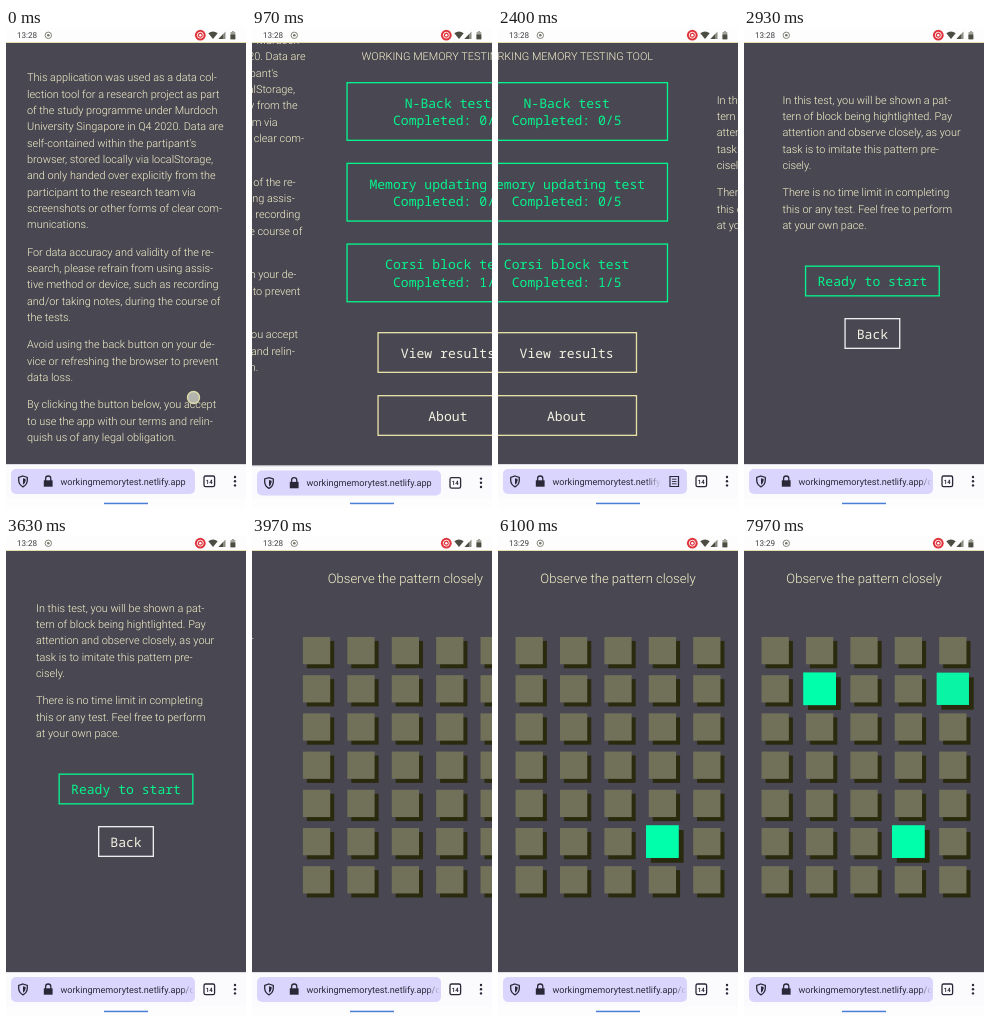
An HTML page with a canvas that plays this animation: 240 by 480 pixels, repeating every 8000 ms.

```html
<!DOCTYPE html>
<html lang="en">
<head>
<meta charset="utf-8">
<title>Working memory testing tool</title>
<style>
  html, body { margin: 0; height: 100%; overflow: hidden; background: #484752; }
  canvas { display: block; width: 240px; height: 480px; }
</style>
</head>
<body>
<canvas id="stage"></canvas>
<script>
const W = 240, H = 480, LOOP = 8000;
const BG = '#484752', CREAM = '#f8f4cc', GREEN = '#05f58c', INK = '#2a2838';
const REM = 10.9, LINE = 1.5 * REM, PARAGRAPH = 2.5 * REM;
const LIGHT = `300 ${REM}px Roboto, sans-serif`;
const HEADING = `300 ${1.2 * REM}px Roboto, sans-serif`;
const MONO = `${1.2 * REM}px "Noto Sans Mono", monospace`;

const canvas = document.getElementById('stage');
const ctx = canvas.getContext('2d');
const dpr = window.devicePixelRatio || 1;
canvas.width = W * dpr;
canvas.height = H * dpr;
ctx.textRendering = 'geometricPrecision';

const clamp = (v, lo = 0, hi = 1) => Math.min(hi, Math.max(lo, v));
const progress = (t, start, length) => clamp((t - start) / length);
const outQuad = p => 1 - (1 - p) ** 2;
const outExpo = p => p >= 1 ? 1 : 1 - 2 ** (-10 * p);

function rect(x, y, w, h, color) {
  ctx.fillStyle = color;
  ctx.fillRect(x, y, w, h);
}

function text(str, x, y, font, color, align = 'left') {
  ctx.font = font;
  ctx.fillStyle = color;
  ctx.textAlign = align;
  ctx.fillText(str, x, y);
}

function circle(x, y, r, fill, stroke, width = 1) {
  ctx.beginPath();
  ctx.arc(x, y, r, 0, 2 * Math.PI);
  if (fill) { ctx.fillStyle = fill; ctx.fill(); }
  if (stroke) { ctx.strokeStyle = stroke; ctx.lineWidth = width; ctx.stroke(); }
}

function shape(d, color, lineWidth) {
  const path = new Path2D(d);
  ctx.fillStyle = ctx.strokeStyle = color;
  ctx.lineWidth = lineWidth;
  lineWidth ? ctx.stroke(path) : ctx.fill(path);
}

function paragraphs(list, x, y) {
  for (const block of list) {
    const lines = block.split('|');
    lines.forEach((line, i) => text(line, x, y + i * LINE, LIGHT, CREAM));
    y += (lines.length - 1) * LINE + PARAGRAPH;
  }
}

function button(lines, y, w, h, border, color) {
  ctx.strokeStyle = border;
  ctx.lineWidth = 1.33;
  ctx.strokeRect((W - w) / 2 + .67, y + .67, w - 1.33, h - 1.33);
  const first = y + h / 2 + 5.2 - (lines.length - 1) * 8.75;
  lines.forEach((line, i) => text(line, W / 2, first + i * 17.5, MONO, color, 'center'));
}

const CONSENT = [
  'This application was used as a data col-|lection tool for a research project as part|of the study programme under Murdoch|University Singapore in Q4 2020. Data are|self-contained within the partipant\'s|browser, stored locally via localStorage,|and only handed over explicitly from the|participant to the research team via|screenshots or other forms of clear com-|munications.',
  'For data accuracy and validity of the re-|search, please refrain from using assis-|tive method or device, such as recording|and/or taking notes, during the course of|the tests.',
  'Avoid using the back button on your de-|vice or refreshing the browser to prevent|data loss.',
  'By clicking the button below, you accept|to use the app with our terms and relin-|quish us of any legal obligation.'
];
const INSTRUCTIONS = [
  'In this test, you will be shown a pat-|tern of block being hightlighted. Pay|attention and observe closely, as your|task is to imitate this pattern pre-|cisely.',
  'There is no time limit in completing|this or any test. Feel free to perform|at your own pace.'
];
const TESTS = [['N-Back test', 0], ['Memory updating test', 0], ['Corsi block test', 1]];
const PATTERN = [[5, 3, 5660], [1, 1, 6670], [1, 4, 7660]];

const scrollAt = t => 70 * outQuad(progress(t, 25, 540));

function consentPage(t) {
  paragraphs(CONSENT, 21, 53.3 - scrollAt(t));
}

function menuPage() {
  text('WORKING MEMORY TESTING TOOL', W / 2, 32, LIGHT, CREAM, 'center');
  TESTS.forEach(([name, done], i) =>
    button([name, `Completed: ${done}/5`], 54 + i * 80.7, 203, 59, GREEN, GREEN));
  button(['View results'], 304, 141, 41, '#e6e0a6', '#f4f2e0');
  button(['About'], 367, 141, 41, '#e6e0a6', '#f4f2e0');
}

function instructionPage() {
  paragraphs(INSTRUCTIONS, 30, 75.6);
  button(['Ready to start'], 237.5, 135, 31, GREEN, GREEN);
  button(['Back'], 290, 56, 31, '#eeecf0', '#f4f2e0');
}

function block(row, col, lit) {
  const size = 27.3, scale = 1 + .2 * lit;
  const mix = (a, b) => Math.round(a + (b - a) * lit);
  ctx.save();
  ctx.translate(31.2 + col * 44.4, 114.6 + row * 38.2);
  ctx.scale(scale, scale);
  rect(4 - size / 2, 4 - size / 2, size, size, '#2a2a0e');
  rect(-size / 2, -size / 2, size, size, `rgb(${mix(113, 0)},${mix(112, 255)},${mix(88, 171)})`);
  ctx.restore();
}

function gridPage(t) {
  text('Observe the pattern closely', W / 2, 47, HEADING, CREAM, 'center');
  for (let row = 0; row < 7; row++) {
    for (let col = 0; col < 5; col++) {
      const hit = PATTERN.find(([r, c]) => r === row && c === col);
      block(row, col, hit ? outQuad(progress(t, hit[2], 430)) : 0);
    }
  }
}

// Each page pushes the previous one off to the left.
const PAGES = [
  [consentPage, -2000], [menuPage, 775], [instructionPage, 2360], [gridPage, 3635]
];

function pages(t) {
  const moved = PAGES.map(([, start]) => outExpo(progress(t, start, 1180)));
  PAGES.forEach(([draw], i) => {
    const x = W * (1 - moved[i] - (moved[i + 1] || 0));
    if (Math.abs(x) >= W) return;
    ctx.save();
    ctx.translate(x, 0);
    draw(t);
    ctx.restore();
  });
}

function touch(t) {
  ctx.globalAlpha = 1 - progress(t, 130, 100);
  circle(187.5, 369.5 - scrollAt(t), 6, 'rgba(200,200,190,.85)', '#dcdaa8', 1.4);
  ctx.globalAlpha = 1;
}

function statusBar(t) {
  rect(0, 0, W, 14, '#fdfdfd');
  rect(0, 14, W, 1, '#e6dfae');
  text(t < 5670 ? '13:28' : '13:29', 11, 10.4, '8.1px Roboto, sans-serif', '#3c3c42');
  circle(42.3, 7.3, 3.2, null, '#77776c', .9);
  circle(42.3, 7.3, 1.3, '#77776c');
  circle(194.3, 7.2, 5.4, '#e0343c');
  circle(194.3, 7.2, 3, null, '#fff', .9);
  circle(194.3, 7.2, 1.2, '#fff');
  shape('M202.3 5.2Q207 1.6 211.7 5.2L207 11Z', '#4b4d42');
  shape('M212.5 11H219.5V3.5Z', '#8b8b84');
  shape('M212.5 11H217V6.2Z', '#4b4d42');
  shape('M224.5 4H226V3H228V4H229.3V11.3H224.5Z', '#a3a39a');
  rect(224.5, 6.5, 4.8, 4.8, '#4b4d42');
}

function fadedUrl(url, from, to) {
  const fade = ctx.createLinearGradient(from, 0, to, 0);
  fade.addColorStop(0, INK);
  fade.addColorStop(1, 'rgba(42,40,56,0)');
  text(url, 54.5, 456.5, '9.1px Roboto, sans-serif', fade);
}

function addressBar(t) {
  const hidden = Math.min(34, scrollAt(t)) * (1 - outQuad(progress(t, 775, 250)));
  const reader = t >= 1250 && t < 2430;
  ctx.save();
  ctx.translate(0, hidden);
  rect(0, 436, W, 35, '#fbfafd');
  rect(0, 436, W, 1, '#dedde4');
  ctx.beginPath();
  ctx.roundRect(5, 441, 184, 25, 5);
  ctx.fillStyle = '#dad5fd';
  ctx.fill();

  shape('M17 448L21.3 449.4V452.5Q21 456.8 17 458.8Q13 456.8 12.7 452.5V449.4Z', INK, 1.3);
  shape('M17 450.3L19.6 451.1V452.5Q19.3 455.5 17 456.8Z', INK);
  shape('M39.6 453V450.6A2.6 2.6 0 0 1 44.8 450.6V453', INK, 1.3);
  rect(37.8, 452.3, 8.8, 6.4, INK);

  const path = t < 2430 ? '' : '/corsi';
  ctx.save();
  ctx.beginPath();
  ctx.rect(54, 441, 134, 25);
  ctx.clip();
  if (reader) fadedUrl('workingmemorytest.netlify.app', 148, 163);
  else fadedUrl('workingmemorytest.netlify.app' + path, path ? 175 : 186, path ? 188 : 200);
  ctx.restore();

  if (reader) {
    shape('M172 448.5H180.5V458.5H172Z', INK, 1.2);
    shape('M174 451.2H178.5M174 453.5H178.5M174 455.8H178.5', INK, .9);
  }

  ctx.beginPath();
  ctx.roundRect(198, 448, 10.6, 10.6, 1.6);
  ctx.strokeStyle = INK;
  ctx.lineWidth = 1.3;
  ctx.stroke();
  text('14', 203.3, 455.5, 'bold 6px Roboto, sans-serif', INK, 'center');
  for (const y of [449, 453.2, 457.4]) circle(229, y, 1.2, INK);
  ctx.restore();

  rect(0, 470.5, W, 10, '#fdfdfe');
  rect(98, 474.7, 44, 1.5, '#4a7fd6');
}

function frame(now) {
  const t = now % LOOP;
  ctx.setTransform(dpr, 0, 0, dpr, 0, 0);
  rect(0, 0, W, H, BG);
  pages(t);
  touch(t);
  addressBar(t);
  statusBar(t);
  requestAnimationFrame(frame);
}
requestAnimationFrame(frame);
</script>
</body>
</html>
```
